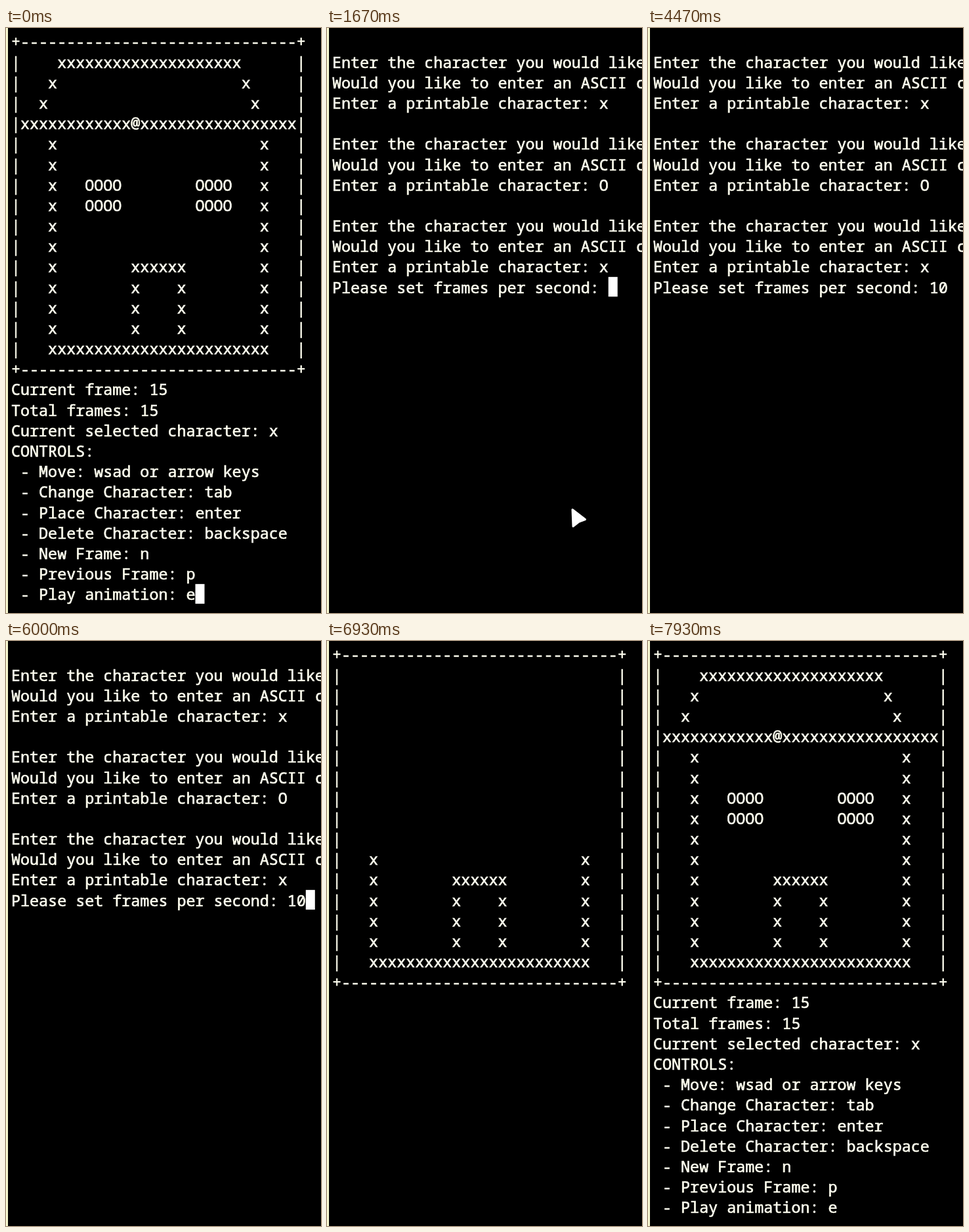
An HTML page for the animation above (8 s loop, 480 by 891 pixels).

```html
<!DOCTYPE html>
<html lang="en">
<head>
<meta charset="utf-8">
<title>Terminal ASCII animator</title>
<style>
:root { --row: 31.18px; }
html, body { margin: 0; width: 100%; height: 100%; overflow: hidden; background: #000; }
#stage {
  position: absolute; inset: 0; width: 480px; height: 891px; overflow: hidden;
  color: #fffff0;
  font: 500 23.385px/var(--row) "Noto Sans Mono", "DejaVu Sans Mono", monospace;
  font-variant-ligatures: none;
  -webkit-text-stroke: .65px;
}
#edge { position: absolute; left: 0; top: 0; width: 3px; height: 100%; background: #f8f8d0; }
#term { position: absolute; left: 8px; top: 5.4px; }
pre { position: absolute; left: 0; top: 0; margin: 0; font: inherit; }
#board, #menu, #prompt, #house, #caret, #term i, #term b {
  animation: 8s step-end infinite;
}
#board { animation-name: board; }
#house { top: var(--row); animation-name: build; }
#menu { top: calc(17 * var(--row)); animation-name: menu; }
#prompt { top: var(--row); animation-name: prompt; }
#term i, #term b { font: inherit; }
.spot { position: relative; }
.spot i { position: absolute; left: 0; top: 0; line-height: normal; }
#term .pen { animation-name: menu; }
#term .mark { animation-name: mark; }
#term .one { animation-name: one; }
#term .zero { animation-name: zero; }
#caret {
  position: absolute; top: 0; left: 0; width: 1ch; height: 30px;
  background: #fff; animation-name: caret;
}
#mouse {
  position: absolute; left: 0; top: 0; width: 28px; height: 34px;
  animation: mouse 8s infinite;
}

@keyframes board {
  0% { opacity: 1; }
  20% { opacity: 0; }
  79.1%, 100% { opacity: 1; }
}
@keyframes menu {
  0% { opacity: 1; }
  20% { opacity: 0; }
  98.95%, 100% { opacity: 1; }
}
@keyframes mark {
  0% { opacity: 0; }
  79.1% { opacity: 1; }
  98.95%, 100% { opacity: 0; }
}
@keyframes prompt {
  0% { opacity: 0; }
  19.95% { opacity: 1; }
  79.1%, 100% { opacity: 0; }
}
@keyframes one { 0% { opacity: 0; } 46.6%, 100% { opacity: 1; } }
@keyframes zero { 0% { opacity: 0; } 48.3%, 100% { opacity: 1; } }
/* One more row from the ground up on each of the 15 ticks */
@keyframes build {
  0% { clip-path: inset(0 0 0 0); }
  79.1% {
    clip-path: inset(calc(14 * var(--row)) 0 0 0);
    animation-timing-function: steps(15, jump-none);
  }
  98.95%, 100% { clip-path: inset(0 0 0 0); }
}
@keyframes caret {
  0% { opacity: 1; transform: translate(20ch, calc(27 * var(--row))); }
  .85% { opacity: 0; transform: translate(20ch, calc(27 * var(--row))); }
  7.4% { opacity: 1; transform: translate(20ch, calc(27 * var(--row))); }
  13.3% { opacity: 0; transform: translate(20ch, calc(27 * var(--row))); }
  19.95% { opacity: 1; transform: translate(30ch, calc(12 * var(--row))); }
  28.3% { opacity: 0; transform: translate(30ch, calc(12 * var(--row))); }
  34.1% { opacity: 1; transform: translate(30ch, calc(12 * var(--row))); }
  40.8% { opacity: 0; transform: translate(30ch, calc(12 * var(--row))); }
  46.6% { opacity: 1; transform: translate(31ch, calc(12 * var(--row))); }
  48.3% { opacity: 1; transform: translate(32ch, calc(12 * var(--row))); }
  55.8% { opacity: 0; transform: translate(32ch, calc(12 * var(--row))); }
  62.4% { opacity: 1; transform: translate(32ch, calc(12 * var(--row))); }
  68.3% { opacity: 0; transform: translate(32ch, calc(12 * var(--row))); }
  74.9% { opacity: 1; transform: translate(32ch, calc(12 * var(--row))); }
  79.1%, 100% { opacity: 0; transform: translate(32ch, calc(12 * var(--row))); }
}
@keyframes mouse {
  0% { transform: translate(449px, 893px); animation-timing-function: step-end; }
  .8% { transform: translate(449px, 893px); animation-timing-function: ease-out; }
  7.4% { transform: translate(372px, 731px); opacity: 1; animation-timing-function: step-end; }
  44.95%, 100% { transform: translate(372px, 731px); opacity: 0; }
}
</style>
</head>
<body>
<div id="stage">
  <div id="edge"></div>
  <div id="term">
    <div id="board"><pre id="border"></pre><pre id="house"></pre></div>
<pre id="menu">
Current frame: 15
Total frames: 15
Current selected character: x
CONTROLS:
 - Move: wsad or arrow keys
 - Change Character: tab
 - Place Character: enter
 - Delete Character: backspace
 - New Frame: n
 - Previous Frame: p
 - Play animation: e</pre>
<pre id="prompt"></pre>
    <div id="caret"></div>
  </div>
  <svg id="mouse" viewBox="0 0 28 34">
    <path d="M2 2.5 L21.5 17.5 L12 21 L3 28 Z" fill="#fff" stroke="#fff" stroke-width="3" stroke-linejoin="round"/>
  </svg>
</div>
<script>
const byId = id => document.getElementById(id);
const xs = n => 'x'.repeat(n);

// Joins [column, text] parts into one padded line
const line = (...parts) => parts.reduce((s, [col, text]) => s.padEnd(col) + text, '');
const wall = (...inner) => line([4, 'x'], ...inner, [27, 'x']);

const rule = '+' + '-'.repeat(30) + '+';
const side = line([0, '|'], [31, '|']);
byId('border').textContent = [rule, ...Array(15).fill(side), rule].join('\n');

const eyes = wall([8, 'OOOO'], [20, 'OOOO']);
const door = wall([13, 'x'], [18, 'x']);
const spot = '<span class="spot"><b class="mark">x</b><i class="pen">@</i></span>';
byId('house').innerHTML = [
  line([5, xs(20)]),
  line([4, 'x'], [25, 'x']),
  line([3, 'x'], [26, 'x']),
  ' ' + xs(12) + spot + xs(17),
  wall(), wall(), eyes, eyes, wall(), wall(),
  wall([13, xs(6)]),
  door, door, door,
  line([4, xs(24)])
].join('\n');

const ask = (char, gap) => [
  'Enter the character you would like',
  'Would you like to enter an ASCII c',
  'Enter a printable character: ' + char + gap
].join('\n');
byId('prompt').innerHTML = [
  ask('x', '\n'), ask('O', '\n'), ask('x', ''),
  'Please set frames per second: <i class="one">1</i><i class="zero">0</i>'
].join('\n');
</script>
</body>
</html>
```
